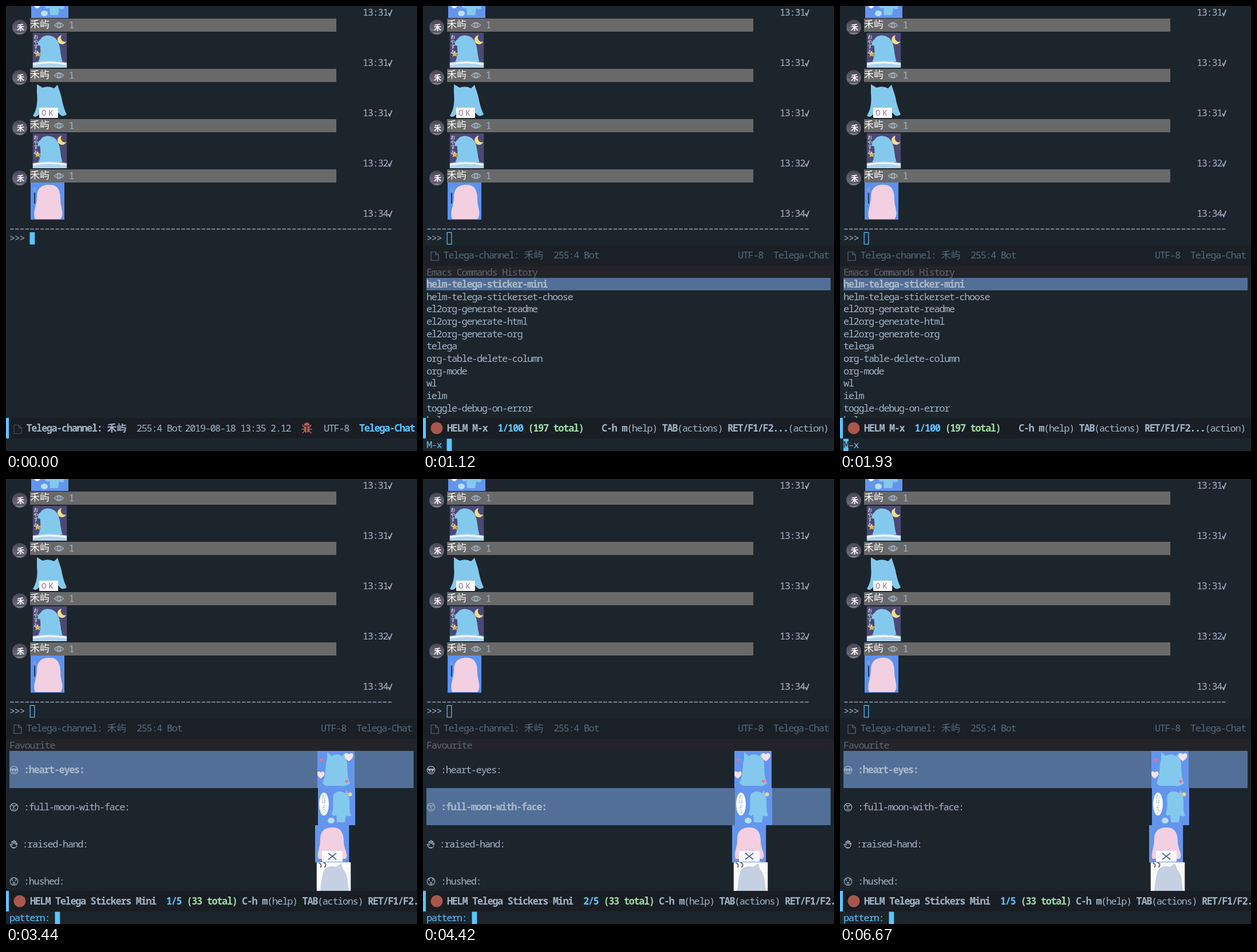
These frames come from a looping animation (718x779 px, 8000 ms). An HTML page:

```html
<!DOCTYPE html>
<html lang="en">
<head>
<meta charset="utf-8">
<title>Sticker picker</title>
<style>
html, body { margin: 0; width: 100%; height: 100%; overflow: hidden; background: #1d252c; }
svg { display: block; }
text { font: 17px "Noto Sans Mono", "DejaVu Sans Mono", monospace; font-stretch: condensed; fill: #a0b3c5; white-space: pre; }
.b { font-weight: 700; }
.blue { fill: #5ec4ff; }
.green { fill: #9fdca6; }
.dim { fill: #56697a; }
.head { fill: #5d6873; }
.sel { fill: #a9b9cb; font-weight: 700; }
.dark { fill: #1d252c; }
text.cjk { font-family: "Noto Sans CJK SC", "Noto Sans CJK JP", sans-serif; letter-spacing: 0; }
.white { fill: #fff; }
.tiny { font-size: 8.5px; font-weight: 500; }
</style>
</head>
<body>
<svg id="stage" width="718" height="779" viewBox="0 0 718 779"></svg>
<script>
const LOOP = 8000, CELL = 8.8, NAME = '禾屿';
const stage = document.getElementById('stage');

const rect = (x, y, w, h, fill, extra = '') =>
  `<rect x="${x}" y="${y}" width="${w}" height="${h}" fill="${fill}" ${extra}/>`;
const path = (d, fill, extra = '') => `<path d="${d}" fill="${fill}" ${extra}/>`;
const disc = (x, y, r, fill) => `<circle cx="${x}" cy="${y}" r="${r}" fill="${fill}"/>`;
const text = (x, y, s, cls = '') => `<text x="${x}" y="${y}" class="${cls}">${s.replace(/>/g, '&gt;')}</text>`;
const cjk = (x, y, s, cls = '') => text(x, y, s, 'cjk ' + cls);
const layer = (id, body) => `<g id="${id}">${body}</g>`;

// Consecutive runs on the character grid: [string, class, ...]
function line(x, y, ...runs) {
  let out = '';
  for (let i = 0; i < runs.length; i += 2) {
    out += text(x, y, runs[i], runs[i + 1]);
    x += runs[i].length * CELL;
  }
  return out;
}

const column = (x, y, step, s, cls) => [...s].map((c, i) => cjk(x, y + i * step, c, 'tiny ' + cls)).join('');
const heart = (x, y, s, fill) =>
  path('M0 4C-9-2-4-8 0-4C4-8 9-2 0 4Z', fill, `transform="translate(${x} ${y}) scale(${s})"`);

const BLUE = '#6495ed', HAIR = '#83c9ee', PINK = '#f2d0e1';
const art = {
  sleep: rect(0, 0, 60, 63, '#4b4974') +
    path('M51 4A8 8 0 1 0 59 15A7 7 0 0 1 51 4Z', '#f5dc8c') +
    path('M9 31l2 4 4 0-3 3 1 4-4-2-4 2 1-4-3-3 4 0z', '#d9b25c') +
    path('M14 11C20 1 38 3 44 15C49 24 48 38 52 50H10C15 40 14 30 13 22C8 24 7 16 14 11Z', HAIR) +
    path('M0 52Q30 46 60 52V63H0Z', '#aed3ee') + path('M1 55Q30 49 59 55', 'none', 'stroke="#f2f6fb" stroke-width="3"') +
    column(1.5, 10, 8.5, 'おやすみ', 'white'),
  ok: path('M8 2L18 8Q28 4 38 9L44 3L48 15C52 25 52 38 60 55Q51 61 46 52H14Q6 63 1 57C9 45 9 29 8 18Z', HAIR) +
    rect(12, 43, 33, 18, '#fbf8fb', 'rx="1"') + '<text x="16" y="57" style="font-size:14px;fill:#977b9c;letter-spacing:4px">OK</text>',
  eh: rect(0, 0, 59, 65, '#5b92f0') +
    path('M11 25C11 9 21 3 34 4C49 4 52 17 52 29C52 44 60 55 52 64H8C3 52 11 40 11 25Z', PINK) +
    cjk(2.5, 15, 'え', 'tiny') + path('M7 18V37', 'none', 'stroke="#17213a" stroke-width="1.6"'),
  love: rect(0, 0, 65, 65, BLUE) +
    path('M17 2L25 9Q34 3 43 9L49 3L51 17C54 32 50 40 57 57Q48 63 42 61H20Q14 63 9 56C16 42 13 27 17 14Z', HAIR) +
    heart(55, 12, 1.5, '#fbe1e9') + heart(6, 43, 1.3, '#fbe1e9') +
    heart(7, 17, .65, '#ef6e8c') + heart(51, 54, .6, '#ef6e8c'),
  morning: rect(0, 0, 65, 65, BLUE) +
    path('M27 12C33 3 43 6 48 9L50 3L53 13C58 25 52 36 58 48Q52 52 49 47L47 60H33L32 47Q26 51 24 45C29 32 25 23 27 12Z', HAIR) +
    '<ellipse cx="10.5" cy="28" rx="8.5" ry="20" fill="#fff"/>' + column(6, 18, 8.3, 'おはよう', 'ink') +
    '<ellipse cx="23" cy="57" rx="6" ry="5" fill="#b7e0f5"/>' + disc(56, 11, 3.6, '#f7d477'),
  cross: rect(0, 0, 59.5, 65, BLUE) +
    path('M9 25C9 9 18 4 31 4C46 4 50 16 50 28C50 42 60 53 53 59H6C2 50 9 40 9 25Z', PINK) +
    rect(12, 45, 36, 19, '#faf9fd') +
    path('M23 49L37 60M37 49L23 60', 'none', 'stroke="#526aa8" stroke-width="1.8"'),
  hush: rect(0, 0, 60, 65, '#fbfafb') +
    path('M11 20C13 8 25 5 34 8L43 2L46 12C56 21 54 37 57 52V65H3C8 48 7 34 11 20Z', '#c5d0e2') +
    path('M4 1Q10 3 7 9M12 0Q19 3 14 9', 'none', 'stroke="#75625f" stroke-width="2"'),
};
const sticker = (kind, x, y, w, h) =>
  `<svg x="${x}" y="${y}" width="${w}" height="${h}" overflow="hidden">${art[kind]}</svg>`;

const page = (x, y, color) =>
  path(`M${x} ${y}h8l5 5v10h-13zM${x + 8} ${y}v5h5`, 'none', `stroke="${color}" stroke-width="1.2"`);
const tick = (x, y) => path(`M${x} ${y - 5}l2.3 4.5l4-10`, 'none', 'stroke="#a0b3c5" stroke-width="1.8"');
const eye = (x, y) =>
  path(`M${x - 8} ${y}q8-9 16 0q-8 9-16 0z`, 'none', 'stroke="#a0b3c5" stroke-width="1.3"') +
  `<circle cx="${x}" cy="${y}" r="3.2" fill="none" stroke="#a0b3c5" stroke-width="1.4"/>` + disc(x, y, 1, '#a0b3c5');

function message(y, kind, x, dy, w, h, time) {
  return rect(42, y, 535, 23, '#696969') + disc(24, y + 15, 13, 'url(#shade)') +
    rect(12, y + 23, 24, 1, '#3b3947') +
    `<text x="19" y="${y + 20}" class="cjk white b" style="font-size:13px">${NAME[0]}</text>` +
    cjk(42, y + 16, NAME, 'white') + eye(92.5, y + 11.5) + text(109.5, y + 17, '1') +
    sticker(kind, x, y + dy, w, h) + text(623, y + 83, time) + tick(668, y + 83);
}

const chat =
  sticker('morning', 44, -44, 65, 65) + text(623, 17, '13:31') + tick(668, 17) +
  message(22, 'sleep', 46.5, 25, 60, 61, '13:31') +
  message(110, 'ok', 46, 25, 61, 61, '13:31') +
  message(198, 'sleep', 46.5, 25, 60, 61, '13:32') +
  message(286, 'eh', 43, 23, 59, 65, '13:34') +
  path('M7.2 390.5H676', 'none', 'stroke="#93a5b5" stroke-width="1.4" stroke-dasharray="6.4 2.4"') +
  text(6, 412, '>>>');

const bar = rect(0, 721, 718, 36, '#181e24') + rect(0, 721, 5, 36, '#5ec4ff') + rect(0, 757, 718, 22, '#1d252c');
const cursor = (x, y) => rect(x, y, 8.8, 21.5, '#5ec4ff');

const bug = `<g transform="translate(525.5 739)" fill="#b65f54" stroke="#b65f54" stroke-width="1.6">
  <path d="M-4-5a4 4 0 0 1 8 0z"/><path d="M-5-3H-.7V8Q-6 8-5-3ZM.7-3H5Q6 8 .7 8Z" stroke="none"/>
  <path d="M-5-2L-8-6M5-2L8-6M-5 2H-9.5M5 2H9.5M-4 5L-8 9M4 5L8 9" fill="none"/></g>`;

const idle = cursor(41.5, 396) + bar + page(14, 733.5, '#46535f') +
  text(35.5, 745, 'Telega-channel:', 'b') + cjk(176.5, 745, NAME, 'b tone') +
  text(228, 745, '255:4 Bot') + text(312.5, 745, '2019-08-18 13:35 2.12') + bug +
  text(555, 745, 'UTF-8') + text(617, 745, 'Telega-Chat', 'b blue');

const split = rect(42.2, 396.5, 7.6, 20.5, 'none', 'stroke="#5ec4ff" stroke-width="1.2"') +
  rect(0, 419, 718, 36, '#1a2026') + page(14, 430.5, '#56697a') +
  text(35.5, 442, 'Telega-channel:', 'dim') + cjk(176.5, 442, NAME, 'dim') +
  text(228, 442, '255:4 Bot', 'dim') + text(550, 442, 'UTF-8', 'dim') + text(612, 442, 'Telega-Chat', 'dim') +
  rect(6, 455, 706, 21, '#232329');

const commands = ['helm-telega-sticker-mini', 'helm-telega-stickerset-choose', 'el2org-generate-readme',
  'el2org-generate-html', 'el2org-generate-org', 'telega', 'org-table-delete-column', 'org-mode',
  'wl', 'ielm', 'toggle-debug-on-error', 'helm'];
const keys = ['C-h m', 'b', '(help) ', '', 'TAB', 'b', '(actions) ', '', 'RET/F1/F2...', 'b', '(action)', ''];
const logo = disc(24, 739, 10.5, '#a9574c');

const history = text(6, 471.5, 'Emacs Commands History', 'head') + rect(6, 476, 706, 21.7, '#526f97') +
  commands.map((c, i) => text(6, 493 + i * 21.65, c, i ? '' : 'sel')).join('') + bar + logo +
  text(42, 745, 'HELM M-x', 'b') + text(130.5, 745, '1/100', 'b blue') +
  text(183.5, 745, '(197 total)', 'b green') + line(312, 745, ...keys);

const promptEnd = text(6, 774, 'M-x', 'blue') + cursor(41.5, 757.5);
const promptStart = text(6, 774, 'M-x', 'blue') + cursor(6, 757.5) + text(6, 774, 'M', 'dark');

const ring = (y, inner) => `<g transform="translate(14 ${y})" fill="none" stroke="#a0b3c5" stroke-width="1.2">${inner}</g>`;
const face = '<circle r="6.7"/>';
const icons = [
  face + '<path d="M-5.8-2H5.8M-3 3Q0 5 3 3"/><path d="M-5-2H-.6Q-1 2-3 1.5Q-5 1-5-2ZM.6-2H5Q5 1 3 1.5Q1 2 .6-2Z" fill="#a0b3c5"/>',
  face + '<path d="M-4-2.5H-1.5M1.5-2.5H4M0-2L-1 1H1M-3 3Q0 5 3 3M-5-4L0-2L5-4"/>',
  '<path d="M-3 6Q-6 3-7 0Q-5-1-3 2L-4-4Q-3-6-2-4L-1-1V-6Q0-7 1-6V-1L2-5Q4-6 3.5-4L3 0L5-2Q6-2 5 1Q4 6 2 6Z"/><path d="M-3 6H2" stroke-width="2"/>',
  face + '<path d="M-3-3V-1M3-3V-1" stroke-width="2"/><circle cy="3" r="1.6"/><path d="M-5-4L-2-5M5-4L2-5"/>',
];
const rows = [
  [':heart-eyes:', 31, 'love', 544, 65], [':full-moon-with-face:', 31, 'morning', 545, 65],
  [':raised-hand:', 28.5, 'cross', 540, 59.5], [':hushed:', 31, 'hush', 542.5, 60],
];
const picker = active => rect(6, 476 + active * 65, 706, 65, '#526f97') +
  rows.map(([label, x, kind, sx, w], i) => ring(509.5 + i * 65, icons[i]) +
    text(x, 515 + i * 65, label, i === active ? 'sel' : '') + sticker(kind, sx, 476 + i * 65, w, 65)).join('') +
  bar + logo + text(42, 745, 'HELM Telega Stickers Mini', 'b') +
  text(280, 745, `${active + 1}/5`, 'b blue') + text(315.5, 745, '(33 total)', 'b green') + line(412, 745, ...keys) +
  text(6, 774, 'pattern:', 'blue') + cursor(85.5, 757.5) + text(6, 471.5, 'Favourite', 'head');

stage.innerHTML = `<defs><linearGradient id="shade" x2="0" y2="1">
  <stop stop-color="#484655"/><stop offset=".8" stop-color="#6e6b7c"/><stop offset="1" stop-color="#858291"/></linearGradient></defs>` +
  rect(0, 0, 718, 779, '#1d252c') + chat + layer('idle', idle) + layer('split', split) +
  layer('history', history) + layer('promptEnd', promptEnd) + layer('promptStart', promptStart) +
  layer('first', picker(0)) + layer('second', picker(1));

// Bring the installed mono face onto the 8.8px grid.
function fitGrid() {
  stage.insertAdjacentHTML('beforeend', '<text id="probe">0000000000</text>');
  const probe = document.getElementById('probe');
  const gap = CELL - probe.getComputedTextLength() / 10;
  probe.remove();
  stage.style.letterSpacing = gap.toFixed(3) + 'px';
}
fitGrid();

const steps = [
  [0, 'idle'], [1120, 'split history promptEnd'], [1930, 'split history promptStart'],
  [1970, 'split first'], [4420, 'split second'], [4670, 'split first'],
];
const layers = [...stage.querySelectorAll('g[id]')];
const start = performance.now();
let shown;
function tickFrame() {
  const t = Math.max(0, performance.now() - start) % LOOP;
  const now = steps.filter(s => s[0] <= t).pop()[1];
  if (now !== shown) {
    const on = now.split(' ');
    for (const g of layers) g.style.display = on.includes(g.id) ? '' : 'none';
    shown = now;
  }
  requestAnimationFrame(tickFrame);
}
tickFrame();
</script>
</body>
</html>
```
